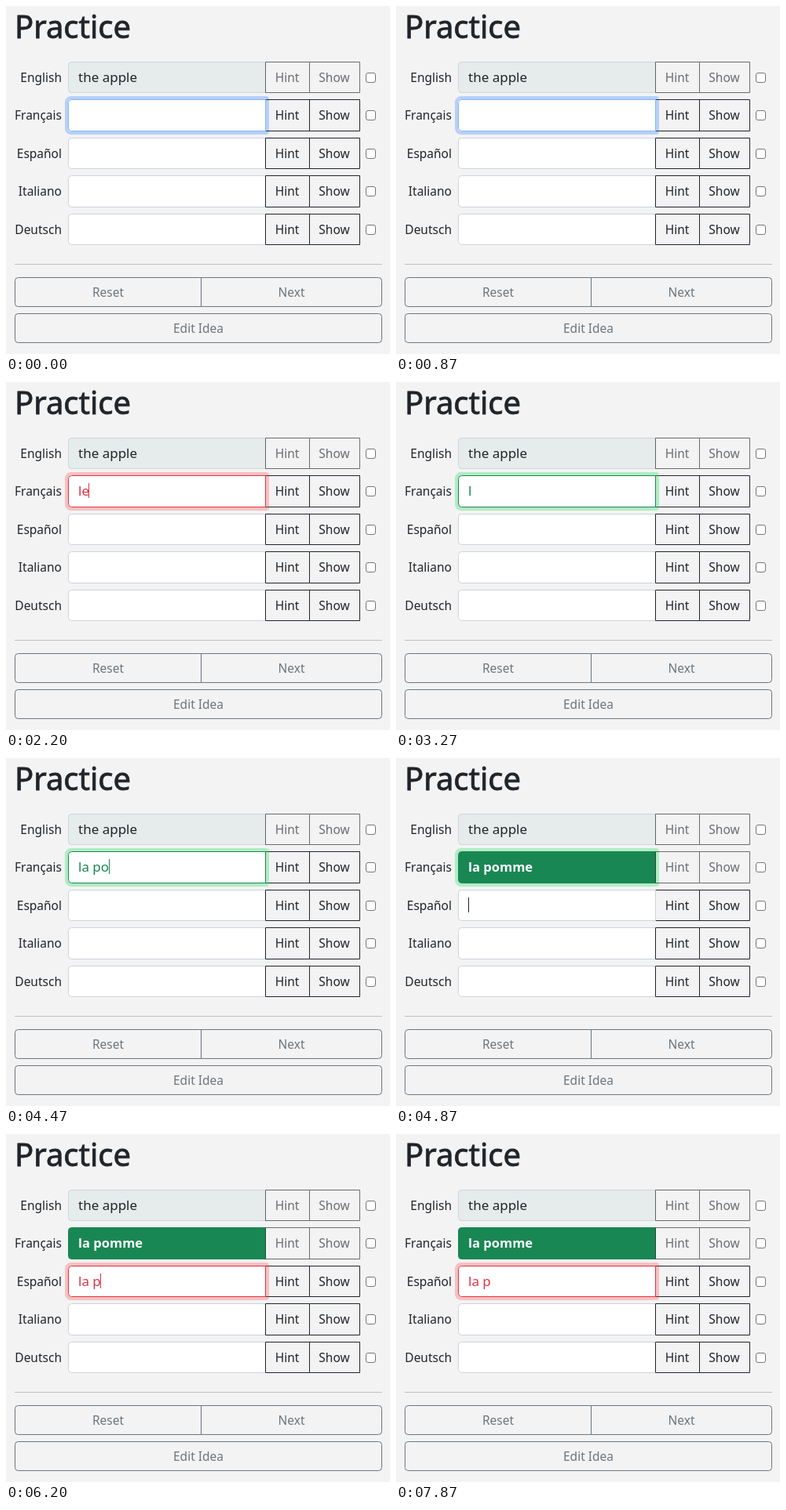
These frames come from a looping animation (489x444 px, 8000 ms). An HTML page:

```html
<!DOCTYPE html>
<html lang="en">
<head>
<meta charset="utf-8">
<title>Practice</title>
<style>
  html, body { margin: 0; width: 100%; height: 100%; overflow: hidden; background: #f3f3f4; }
  svg { display: block; width: 489px; height: 444px; }
  text { font: 15.5px "Noto Sans", "Open Sans", sans-serif; fill: #212529; white-space: pre; }
  .title { font-size: 40px; stroke: #212529; stroke-width: .8px; }
  .value { font-size: 17px; }
  .value.done { font-size: 16.5px; font-weight: 700; fill: #fff; }
  .label { text-anchor: end; }
  .centered { text-anchor: middle; }
  .frame { fill: none; stroke: #212529; }
  .muted .frame { stroke: #6c757d; }
  .muted text { fill: #6c757d; }
  .check { fill: #fff; stroke: #767676; }
</style>
</head>
<body>
<svg id="stage" viewBox="0 0 489 444"></svg>
<script>
const LOOP = 8000, FADE = 130, BLINK = 600;
const LANGUAGES = ['English', 'Français', 'Español', 'Italiano', 'Deutsch'];

// Each tone: border rgb, glow rgba, text colour
const TONES = {
  rest:  { border: [206, 212, 218], glow: [13, 110, 253, 0], ink: '#212529' },
  focus: { border: [134, 183, 254], glow: [13, 110, 253, .26], ink: '#212529' },
  good:  { border: [25, 135, 84], glow: [40, 220, 90, .32], ink: '#198754' },
  bad:   { border: [220, 53, 69], glow: [255, 60, 60, .28], ink: '#dc3545' },
  done:  { border: [25, 135, 84], glow: [40, 220, 90, 0], ink: '#fff' }
};

const step = (at, row, text, tone, caret = true) => ({ at, row, text, tone, caret });
const STEPS = [
  step(-1000, 1, '', 'focus'),
  step(1670, 1, 'l', 'good'),
  step(2070, 1, 'le', 'bad'),
  step(3130, 1, 'l', 'good', false),
  step(3470, 1, 'la', 'good'),
  step(3730, 1, 'la ', 'good'),
  step(4270, 1, 'la p', 'good'),
  step(4470, 1, 'la po', 'good'),
  step(4600, 1, 'la pom', 'good'),
  step(4730, 1, 'la pomm', 'good'),
  step(4870, 2, '', 'focus'),
  step(5530, 2, 'l', 'good'),
  step(5670, 2, 'la', 'good'),
  step(5800, 2, 'la ', 'good'),
  step(6070, 2, 'la p', 'bad')
];

const rowTop = i => Math.round(71 + 48.4 * i);
const rowBottom = i => Math.round(111.4 + 48.4 * i);

// Rectangle with separate left and right corner radii
function box(x, y, w, h, l = 0, r = 0) {
  return `M${x + l} ${y}h${w - l - r}a${r} ${r} 0 0 1 ${r} ${r}v${h - 2 * r}` +
    `a${r} ${r} 0 0 1 ${-r} ${r}h${l + r - w}a${l} ${l} 0 0 1 ${-l} ${-l}` +
    `v${2 * l - h}a${l} ${l} 0 0 1 ${l} ${-l}z`;
}
const frame = (...args) => `<path class="frame" d="${box(...args)}"/>`;
const label = (x, y, text, cls = 'centered') => `<text class="${cls}" x="${x}" y="${y}">${text}</text>`;

function rowMarkup(name, i) {
  const top = rowTop(i), h = rowBottom(i) - top, base = top + 26;
  const buttons = `<g id="buttons${i}">` +
    frame(330.5, top + .5, 56, h - 1) + frame(386.5, top + .5, 64, h - 1) +
    label(358, base, 'Hint') + label(418, base, 'Show') + '</g>';
  const field = `<g id="field${i}">
    <path id="glow${i}" d="${box(77, top - 2, 256, h + 4, 6, 2)}" fill="none" stroke-width="4"/>
    <path id="input${i}" d="${box(79.5, top + .5, 251, h - 1, 4)}"/>
    <text id="value${i}" class="value" x="92" y="${base}"></text>
    <rect id="caret${i}" y="${top + 10}" width="1" height="19"/></g>`;
  return label(71, base, name, 'label') +
    `<g id="row${i}">${field}${buttons}</g>` +
    `<rect class="check" x="458.5" y="${top + 14.5}" width="12" height="12" rx="2.5"/>`;
}

const $ = id => document.getElementById(id);
$('stage').innerHTML = label(11, 41, 'Practice', 'title') +
  LANGUAGES.map(rowMarkup).join('') +
  `<path d="M11 329.5H479" stroke="#bfc0c2"/>
  <g class="muted">` +
  frame(11.5, 346.5, 237, 37, 4) + frame(248.5, 346.5, 230, 37, 0, 4) +
  frame(11.5, 392.5, 467, 37, 4, 4) +
  label(130, 371, 'Reset') + label(363.5, 371, 'Next') + label(245, 417, 'Edit Idea') + '</g>';

const rows = LANGUAGES.map((_, i) => {
  const parts = {};
  for (const part of ['row', 'field', 'buttons', 'glow', 'input', 'value', 'caret']) parts[part] = $(part + i);
  return parts;
});

const mix = (a, b, p) => a.map((v, i) => v + (b[i] - v) * p);
const ease = p => p * p * (3 - 2 * p);
const toneOf = (s, i) => s.row === i ? s.tone : i > 0 && i < s.row ? 'done' : 'rest';

function render(t) {
  const index = STEPS.findLastIndex(s => s.at <= t);
  const now = STEPS[index], before = STEPS[Math.max(0, index - 1)];
  const p = ease(Math.min(1, (t - now.at) / FADE));
  const caretOn = now.caret && (t - now.at) % (2 * BLINK) < BLINK;

  rows.forEach((r, i) => {
    const tone = toneOf(now, i), to = TONES[tone], from = TONES[toneOf(before, i)];
    const active = now.row === i, done = tone === 'done';
    r.glow.setAttribute('stroke', `rgba(${mix(from.glow, to.glow, p)})`);
    r.input.setAttribute('stroke', `rgb(${mix(from.border, to.border, p)})`);
    r.input.setAttribute('fill', done ? '#198754' : i ? '#fff' : '#e6ebeb');
    r.value.textContent = active ? now.text : done ? 'la pomme' : i ? '' : 'the apple';
    r.value.setAttribute('class', done ? 'value done' : 'value');
    r.value.style.fill = to.ink;
    r.buttons.setAttribute('opacity', done || !i ? .65 : 1);
    // The focused field overlaps its buttons
    const last = active ? r.field : r.buttons;
    if (r.row.lastElementChild !== last) r.row.append(last);
    r.caret.setAttribute('visibility', active && caretOn ? 'visible' : 'hidden');
    if (active) {
      r.caret.setAttribute('x', 92 + Math.floor(now.text && r.value.getComputedTextLength()));
      r.caret.setAttribute('fill', to.ink);
    }
  });
}

const start = performance.now();
function tick() {
  render((performance.now() - start) % LOOP);
  requestAnimationFrame(tick);
}
tick();
</script>
</body>
</html>
```
